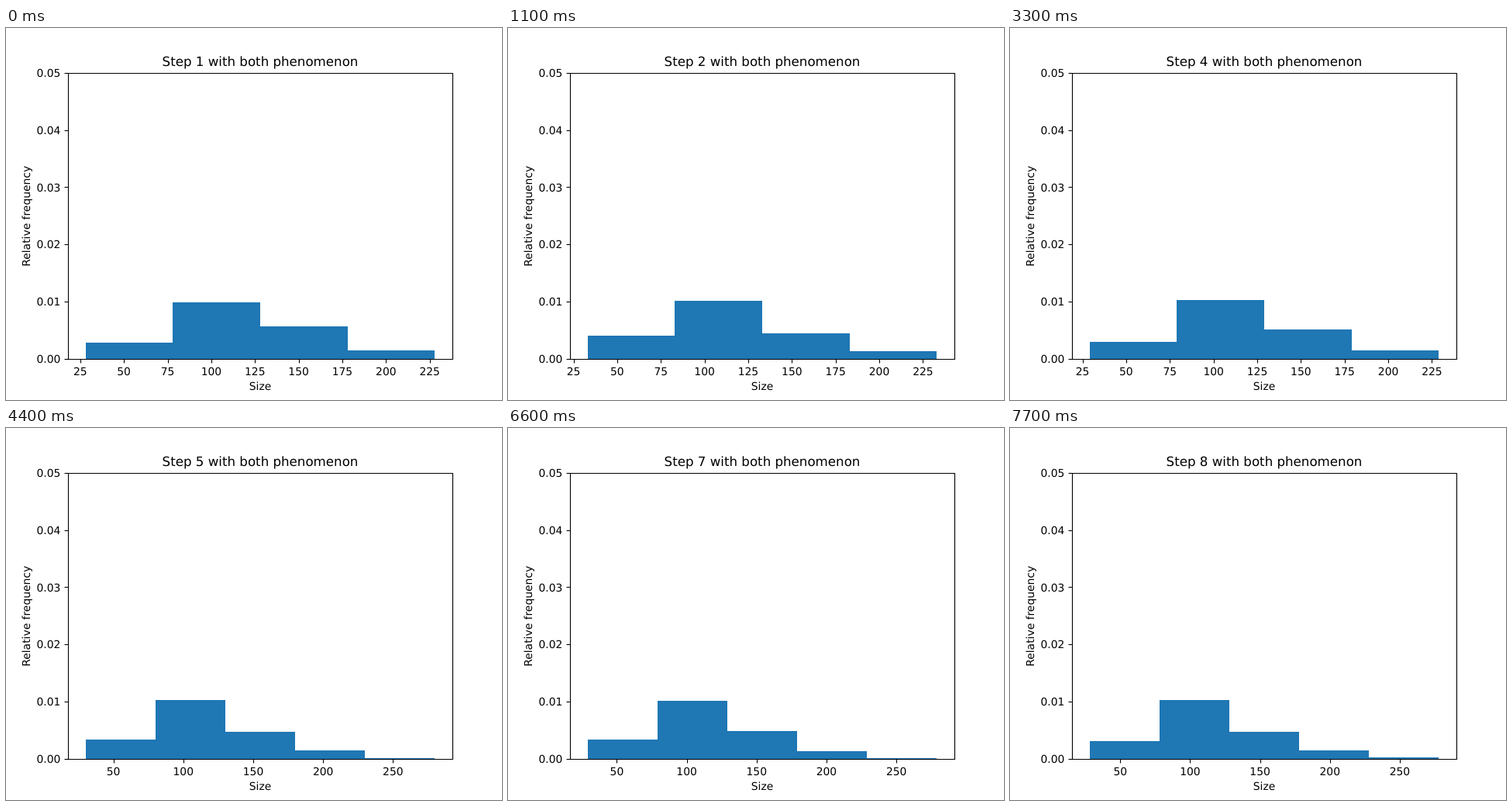
These frames come from a looping animation (640 px wide and 480 px high, 8000 ms). An HTML page:

```html
<!DOCTYPE html>
<html lang="en">
<head>
<meta charset="utf-8">
<title>Size histogram</title>
<style>
html, body { margin: 0; width: 100%; height: 100%; overflow: hidden; background: #fff; }
svg { display: block; width: 640px; height: 480px; }
text { font: 13.889px "DejaVu Sans", sans-serif; text-rendering: geometricPrecision; text-anchor: middle; }
#title { font-size: 16.667px; }
#yAxis text { text-anchor: end; }
path { fill: none; stroke: #000; stroke-width: 1.11; }
#bars rect { fill: #1f77b4; }
</style>
</head>
<body>
<svg viewBox="0 0 640 480">
  <g id="bars"></g>
  <g id="xAxis"></g>
  <g id="yAxis"></g>
  <path d="M80.5 58.5H576.5V427.5H80.5Z"/>
  <text id="title" x="328" y="49"></text>
  <text x="328" y="467">Size</text>
  <text transform="translate(31 242.8) rotate(-90)">Relative frequency</text>
</svg>
<script>
const STEP_MS = 1100, LOOP_MS = 8000;
const BASE = 427, BIN = 50;
const PLOT_LEFT = 102.545, PLOT_WIDTH = 450.909;

// Each step: lower edge of the first bin, then bar heights in pixels.
const steps = [
  [28, [21, 73, 42, 11]],
  [33, [30, 75, 33, 10]],
  [33, [27, 76, 33, 11, 0, 0]],
  [29, [22, 76, 38, 11]],
  [30, [25, 76, 35, 11, 1]],
  [34, [33, 74, 31, 9]],
  [29, [25, 75, 36, 10, 1]],
  [28, [23, 76, 35, 11, 2]]
];

const $ = id => document.getElementById(id);
const label = (x, y, s) => `<text x="${x}" y="${y}">${s}</text>`;

function yAxis() {
  let out = "";
  for (let i = 0; i <= 5; i++) {
    const y = 427.2 - i * 73.92;
    out += `<path d="M75.5 ${Math.round(y) + 0.5}H80.5"/>`;
    out += label(70.3, Math.round(y + 5.1), (i / 100).toFixed(2));
  }
  return out;
}

function draw(index) {
  const [start, heights] = steps[index];
  const span = heights.length * BIN;
  const toX = v => PLOT_LEFT + (v - start) / span * PLOT_WIDTH;

  $("title").textContent = `Step ${index + 1} with both phenomenon`;

  $("bars").innerHTML = heights.map((h, i) => {
    const x = Math.round(toX(start + i * BIN));
    const w = Math.round(toX(start + (i + 1) * BIN)) - x;
    return `<rect x="${x}" y="${BASE - h}" width="${w}" height="${h}"/>`;
  }).join("");

  const gap = span > 200 ? 50 : 25, margin = span * 0.05;
  let ticks = "";
  for (let v = Math.ceil((start - margin) / gap) * gap; v <= start + span + margin; v += gap) {
    const x = toX(v);
    ticks += `<path d="M${Math.round(x) + 0.5} 427.5V432.5"/>` + label(x.toFixed(2), 448, v);
  }
  $("xAxis").innerHTML = ticks;
}

$("yAxis").innerHTML = yAxis();

let shown = -1;
const origin = performance.now();

function tick() {
  const t = (performance.now() - origin) % LOOP_MS;
  const index = Math.floor(t / STEP_MS);
  if (index !== shown) draw(shown = index);
  requestAnimationFrame(tick);
}
tick();
</script>
</body>
</html>
```
